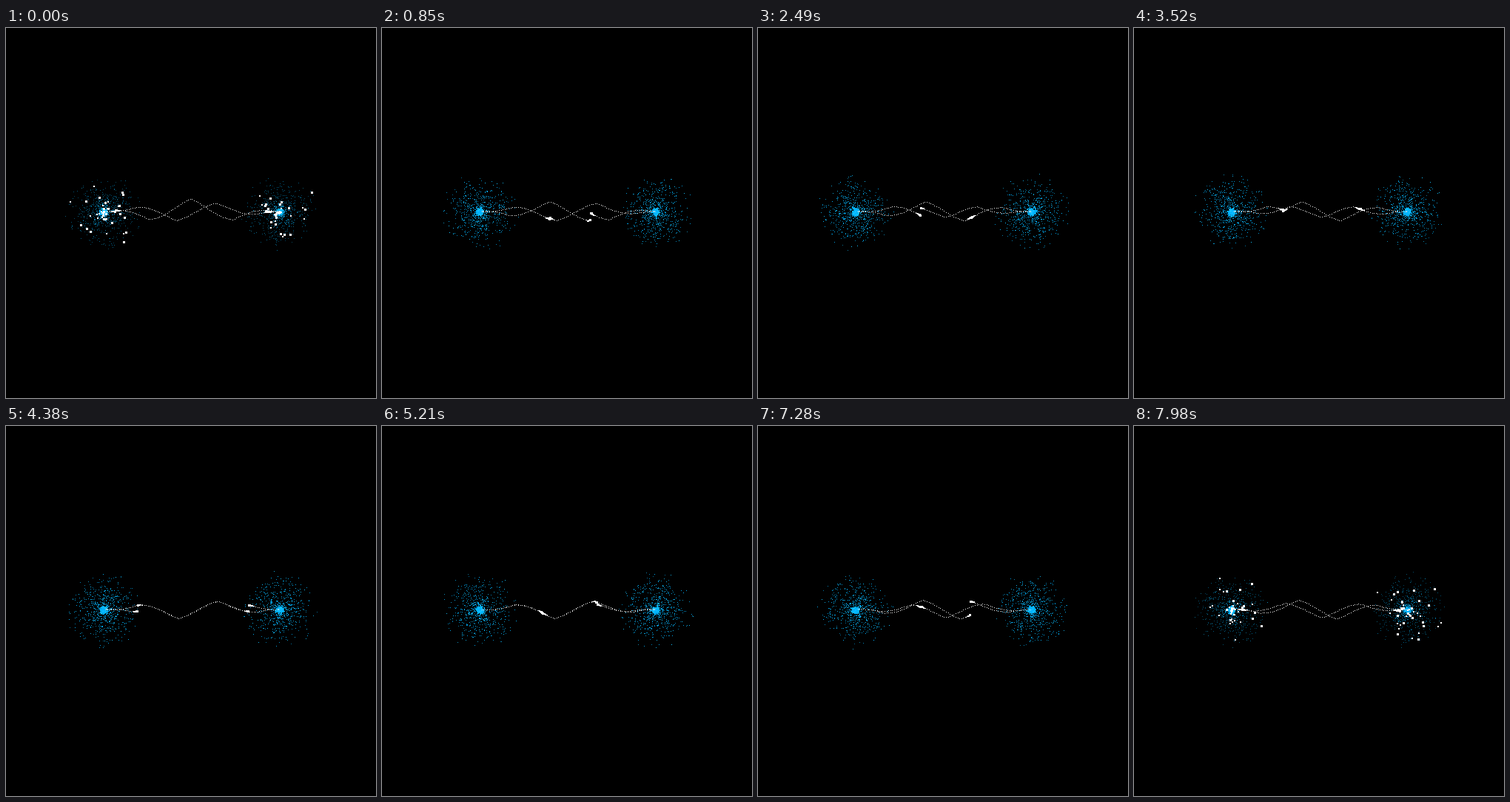
These frames come from a looping animation (500 px wide and 500 px high, 8 s). An HTML page with a canvas:

```html
<!DOCTYPE html>
<html lang="en">
<head>
<meta charset="utf-8">
<title>Particle link</title>
<style>
html, body { margin: 0; width: 100%; height: 100%; overflow: hidden; background: #000; }
canvas { display: block; width: 500px; height: 500px; }
</style>
</head>
<body>
<canvas id="stage" width="500" height="500"></canvas>
<script>
const ctx = document.getElementById('stage').getContext('2d');
const LOOP = 8000;
const RATE = 0.000626;   // crossings per ms
const START = 0.06;
const LEFT = 132, SPAN = 238, MID = 249;
const COUNT = 800, LIFE = 1100;

// A wave is the place of its crest along the span, its frequency and its height
const early = { crest: 0.385, freq: 2.25, height: 14 };
const late = { crest: 0.65, freq: 2.2, height: 13 };
const peak = { crest: 0.5, freq: 2.1, height: 17 };
const weave = { crest: 0.675, freq: 2.85, height: 8 };
const notch = { crest: 0.31, freq: 2.35, height: 11 };

// Wave pair left behind by each crossing; the first is there at the start
const trails = [
  [peak, late], [early, late], [early, weave],
  [late, late], [late, weave], [early, notch]
];

function hash(a, b) {
  let h = Math.imul(a + 1, 374761393) ^ Math.imul(b + 7, 668265263);
  h = Math.imul(h ^ (h >>> 13), 1274126177);
  h = Math.imul(h ^ (h >>> 15), 2246822519);
  return ((h ^ (h >>> 16)) >>> 0) / 4294967296;
}

function trail(turn, lane) {
  const n = Math.min(turn, trails.length - 1);
  const shape = trails[n][lane];
  return { ...shape, crest: shape.crest + 0.03 * (hash(n, lane) - 0.5) };
}

// Pointed oscillation that flattens towards both clouds
function waveY({ crest, freq, height }, u) {
  const swing = Math.cos(2 * Math.PI * freq * (u - crest));
  const pointed = Math.asin(swing) * 2 / Math.PI;
  const envelope = Math.sin(Math.PI * u) ** 1.4;
  return MID - 1 - height * envelope * (0.7 * pointed + 0.3 * swing);
}

function dot(x, y, size) {
  ctx.fillRect(Math.round(x - size / 2), Math.round(y - size / 2), size, size);
}

function drawCloud(cx, seed, t, flash) {
  const sparks = [];
  for (let i = 0; i < COUNT; i++) {
    const clock = t / LIFE + hash(i, seed);
    const turn = Math.floor(clock), age = clock - turn;
    const key = seed + turn * 5;
    const angle = hash(i, key + 101) * Math.PI * 2;
    const r = age ** 1.4 * (34 + 20 * hash(i, key + 211));
    const x = cx + r * Math.cos(angle), y = MID + r * Math.sin(angle);
    if (flash && i % 20 === 0) sparks.push([x, y, hash(i, key + 307) < 0.45 ? 3 : 2]);
    const glow = 0.55 + 0.45 * hash(i, key + 401);
    ctx.globalAlpha = flash ? glow * (1 - 0.45 * Math.min(1, r / 22)) : glow;
    ctx.fillStyle = i % 3 ? '#00b4ff' : '#16c4ff';
    dot(x, y, r < 5 ? 2 : 1);
  }
  ctx.globalAlpha = 1;
  ctx.fillStyle = '#fff';
  for (const [x, y, size] of sparks) dot(x, y, size);
}

// Each head replaces the old wave with a new one as it passes
function drawLink(ahead, behind, head, dir) {
  const edge = dir > 0 ? head : 1 - head;
  const plot = (u, size) => {
    const shape = (edge - u) * dir > 0 ? behind : ahead;
    dot(LEFT + SPAN * u, waveY(shape, u), size);
  };
  ctx.fillStyle = '#e6e6e6';
  for (let x = 3; x < SPAN; x += 2.6) plot(x / SPAN, 1);

  ctx.fillStyle = '#fff';
  for (let k = -6; k <= 6; k++) {
    const u = Math.min(1, Math.max(0, edge + k / SPAN));
    plot(u, Math.round(3 - Math.abs(k) / 3));
  }
}

function draw(t) {
  const phase = START + t * RATE;
  const turn = Math.floor(phase), p = phase - turn;
  const flash = p < 0.09;
  const lead = Math.sin(Math.PI * p);

  ctx.globalAlpha = 1;
  ctx.fillStyle = '#000';
  ctx.fillRect(0, 0, 500, 500);
  drawCloud(LEFT, 3, t, flash);
  drawCloud(LEFT + SPAN, 1009, t, flash);
  drawLink(trail(turn, 0), trail(turn + 1, 0), p + 0.04 * lead, 1);
  drawLink(trail(turn, 1), trail(turn + 1, 1), p + 0.012 * lead, -1);
}

const begin = performance.now();
function frame() {
  draw((performance.now() - begin) % LOOP);
  requestAnimationFrame(frame);
}
frame();
</script>
</body>
</html>
```
